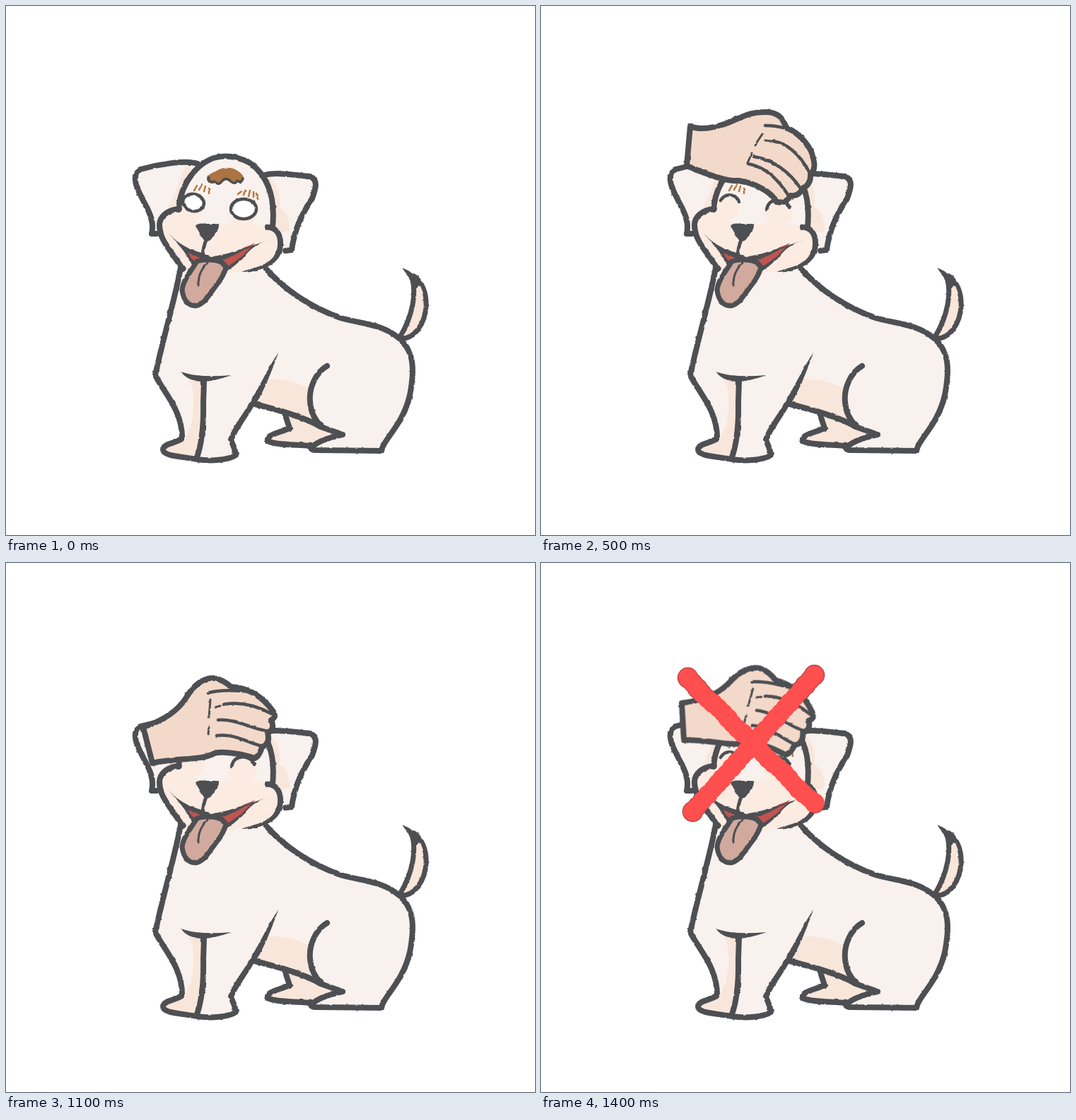
An HTML page that plays this animation: 748x748 px, repeating every 2000 ms.

```html
<!DOCTYPE html>
<html lang="en">
<head>
<meta charset="utf-8">
<title>Petting a dog</title>
<style>
  html, body { margin: 0; width: 100%; height: 100%; overflow: hidden; background: #fff; }
  svg { display: block; width: 100vw; height: 100vh; }
  .line { fill: none; stroke: #4d4f53; stroke-width: 8; stroke-linecap: round; stroke-linejoin: round; }
  .thin { stroke-width: 4.5; }
  .fine { stroke-width: 3; }
  .ink { fill: #4d4f53; }
  .fur { fill: #f9f1ed; }
  .shade { fill: #f9e6da; }
  .blush { fill: #fcebe1; }
  .skin { fill: #f3d9c9; }
  .tongue { fill: #d1aa9d; stroke-width: 7; }
  .white { fill: #fff; }
  .red { fill: #ff4f4f; }
  .edge { fill: #ff4f4f; stroke: #8a2a2a; stroke-width: 1.5; }
  .edge * { vector-effect: non-scaling-stroke; }
</style>
</head>
<body>
<svg viewBox="0 0 748 748">
  <filter id="rough" filterUnits="userSpaceOnUse" x="0" y="0" width="748" height="748" color-interpolation-filters="sRGB">
    <feTurbulence type="fractalNoise" baseFrequency=".14" numOctaves="2" seed="4"/>
    <feDisplacementMap in="SourceGraphic" scale="2.5" xChannelSelector="R" yChannelSelector="G"/>
  </filter>

  <g class="cross edge"></g>

  <g filter="url(#rough)">
    <!-- tail -->
    <path class="shade" d="M575 382C588 388 595 405 594 425C592 450 578 470 560 470C576 435 580 405 575 382Z"/>
    <path class="line" style="stroke-width:7" d="M577 382C588 390 595 405 594 425C592 450 578 470 560 470M575 388C579 405 577 435 557 468"/>
    <path class="ink" d="M560 370C572 375 582 381 589 392L577 402C574 390 568 382 560 370Z"/>

    <!-- body -->
    <path class="shade" d="M395 578L401 598C385 604 368 606 369 614C380 622 410 621 440 624L478 608L445 594Z"/>
    <path class="fur" d="M247 366C240 410 222 470 211 522C222 545 250 572 249 612C240 618 222 620 222 627C222 638 250 637 270 641C290 644 315 642 325 635C324 625 320 620 318 613C325 595 340 578 348 562C380 570 420 580 445 596L478 608C460 610 442 614 432 625L532 628C535 608 562 590 571 550C580 505 573 485 556 470C530 448 500 450 470 440C430 425 395 402 368 372L330 340Z"/>
    <path class="shade" d="M368 528Q400 526 428 541Q426 570 442 590L348 562ZM258 528Q270 545 262 590Q258 606 250 613L223 627L232 637L270 639Q281 600 279 530Z"/>
    <path class="line" d="M247 370C240 410 222 470 211 522C222 545 250 572 249 612C240 618 222 619 222 627C222 637 250 637 270 641C290 644 315 642 325 635C324 625 320 620 318 613C325 595 340 578 348 562C380 570 420 580 445 595L476 606C460 610 442 614 431 625Q432 628 438 628L531 629L532 625C537 610 562 590 571 550C580 505 573 485 556 470C530 448 500 450 470 440C430 425 395 402 368 372"/>
    <path class="line" d="M395 579L401 597C385 604 368 606 370 615C380 621 410 620 432 622M280 530L279 560Q280 610 270 638M454 509C438 518 428 540 430 560C431 575 436 585 446 594"/>
    <path class="ink" d="M385 490C375 520 362 550 351 566L344 561C358 540 369 514 385 490ZM248 517Q268 526 319 522Q285 534 268 530Q252 526 248 517Z"/>

    <!-- ears -->
    <path class="fur" d="M270 223C250 217 215 224 190 231C180 237 181 250 190 267C198 285 210 300 206 322L214 322L240 300L268 230ZM366 238C380 234 400 238 430 241C442 246 438 258 433 272C418 295 408 315 404 345L394 345L370 300Z"/>
    <path class="shade" d="M253 226L266 232L244 290L226 292L240 262ZM370 240Q392 258 386 285Q400 290 401 318L390 320L372 300Z"/>
    <path class="line" d="M271 223C255 217 215 224 190 231C180 237 181 250 190 267C198 285 211 300 206 322L213 322M366 239C380 235 400 238 430 241C442 246 438 258 433 272C418 295 408 315 404 345L395 346"/>

    <!-- head -->
    <path class="fur" d="M243 288C246 255 268 222 297 215C315 211 330 214 345 222C370 240 381 270 377 312C388 316 389 335 385 345C380 362 365 372 335 374L280 385L250 372L232 345C222 332 217 322 217 310C217 298 228 288 243 288Z"/>
    <path class="blush" d="M243 288C252 292 262 303 275 307L302 309C330 306 365 308 379 315C388 320 389 335 385 345C380 362 365 372 335 374L280 385L250 372L232 345C222 332 217 322 217 310C217 298 228 288 243 288Z"/>
    <circle class="blush" cx="263" cy="284" r="18"/>
    <circle class="blush" cx="335" cy="292" r="20"/>
    <path class="line" d="M244 288C246 255 268 222 297 214C315 210 330 214 345 222C370 240 381 270 377 312M245 287C228 288 217 298 217 310C217 322 222 332 232 346L250 372"/>
    <path class="ink" d="M366 309C384 307 393 322 392 337C390 362 370 375 333 376C350 369 376 368 383 345C387 326 380 315 366 317Z"/>
    <path fill="#ab7440" d="M284 246Q285 237 296 234Q308 226 322 230Q338 238 336 246Q332 253 327 248Q325 255 318 250Q311 243 305 250Q301 256 296 250Q288 254 284 246Z"/>
    <path class="line" style="stroke-width:3.5" d="M286 242Q285 251 296 248Q300 255 306 247Q311 241 318 248Q324 253 327 247Q333 251 335 244"/>
    <path fill="none" stroke="#b57744" stroke-width="2.5" stroke-linecap="round" d="M266 261l4-7m3 6l4-8m3 10l2-7m5 10v-7M328 266l5-4m3 5l2-6m5 8l2-8m5 9v-7m6 10l-2-8"/>
    <g id="open" class="line thin white" style="fill:#fff">
      <ellipse cx="265" cy="278" rx="15" ry="12" transform="rotate(12 265 278)"/>
      <ellipse cx="336" cy="287" rx="18" ry="14"/>
    </g>
    <path id="closed" class="line thin" d="M254 275Q260 265 271 268Q279 271 280 277M319 288Q321 275 335 274Q349 276 351 285"/>

    <!-- muzzle -->
    <path class="ink" d="M268 311Q270 306 285 308L298 308Q303 311 299 317L290 330Q285 335 279 330Z"/>
    <path fill="#c15450" d="M253 345L275 355L266 366ZM300 358L352 335Q335 358 306 374Z"/>
    <path class="ink" d="M229 321Q250 343 277 349L290 355L313 350L372 331Q349 337 335 357Q322 369 308 378L305 372Q328 362 346 341L310 358L285 361L258 349Q262 360 270 362L264 368Q254 346 229 321Z"/>
    <path class="line" style="stroke-width:5" d="M283 331Q279 340 278 354"/>
    <path class="line tongue" style="fill:#d1aa9d" d="M270 361C261 376 250 388 249 402C251 416 258 424 268 424C278 423 285 412 290 405C300 392 309 380 311 369C306 358 283 357 270 361Z"/>
    <path class="line fine" d="M285 363Q271 377 272 395"/>
  </g>

  <g id="flat" filter="url(#rough)">
    <path class="line" style="fill:#f3d9c9" d="M194 232C225 222 245 206 255 190C265 173 280 161 295 163Q307 165 318 175C342 176 362 188 378 210Q383 218 375 222Q381 235 370 240Q374 256 362 260Q359 272 352 276C340 272 310 265 295 269C275 280 240 275 207 283Z"/>
    <path class="line thin" d="M286 184C300 179 325 180 346 182M308 200Q340 194 375 213M300 222C325 220 345 234 371 238M298 244C325 241 340 254 363 259"/>
    <path class="line fine" d="M289 193L287 218M287 231L286 242M296 204L303 202"/>
  </g>
  <g id="curled" filter="url(#rough)">
    <path class="line" style="fill:#f3d9c9" d="M211 170C225 176 245 172 262 166C285 157 295 149 320 150C337 151 342 160 347 172C366 180 384 200 386 220Q388 232 381 238Q382 252 370 258Q364 270 353 268Q347 280 333 277C326 262 300 250 280 247C260 248 235 238 206 226Z"/>
    <path class="line thin" d="M317 169Q332 169 346 173M328 191C348 194 366 210 380 236M301 213C328 217 352 235 367 258M293 223C318 228 335 245 350 268"/>
    <path class="line fine" d="M313 181L303 196M298 208L292 222M317 190L325 191"/>
  </g>

  <g class="cross red"></g>
</svg>
<script>
const $ = id => document.getElementById(id);
const crosses = document.querySelectorAll('.cross');

// A brush stroke made of overlapping, slightly uneven dabs.
function brush(x1, y1, x2, y2) {
  const n = 25;
  return Array.from({ length: n + 1 }, (_, i) => {
    const k = i / n, j = Math.sin(i * 7.3 + x1) * .7;
    const r = i % n ? 13.4 + Math.sin(i * 4.1) * .4 : 14;
    return `<circle cx="${x1 + (x2 - x1) * k + j}" cy="${y1 + (y2 - y1) * k - j}" r="${r}"/>`;
  }).join('');
}
const dabs = brush(-93, -93, 86, 84) + brush(87, -98, -85, 95);
crosses.forEach(c => c.innerHTML = dabs);

const show = (el, on) => el.style.display = on ? '' : 'none';

function draw(now) {
  const step = Math.floor(now % 2000 / 100);

  // The hand slides in, then strokes down, middle, up, middle.
  const swing = step < 3 || step > 11 ? 1 : [0, 1, 2, 1][(step - 3) % 4];
  const enter = Math.min(0, step - 3) * 86;
  $('flat').setAttribute('transform', `translate(${6 * swing + enter} ${-16 * swing}) rotate(${11 * swing} 287 218)`);
  show($('flat'), step > 0 && swing < 2);
  show($('curled'), swing === 2);
  show($('open'), step < 3);
  show($('closed'), step >= 3);

  // The cross flies in from close up.
  const near = Math.max(0, (14 - step) / 2);
  crosses.forEach(c => {
    show(c, step > 11);
    c.setAttribute('transform', `translate(${300 + 45 * near} ${256 + 29 * near}) rotate(${-2 * near}) scale(${1 + 5.6 * near})`);
  });
  requestAnimationFrame(draw);
}
draw(performance.now());
</script>
</body>
</html>
```
